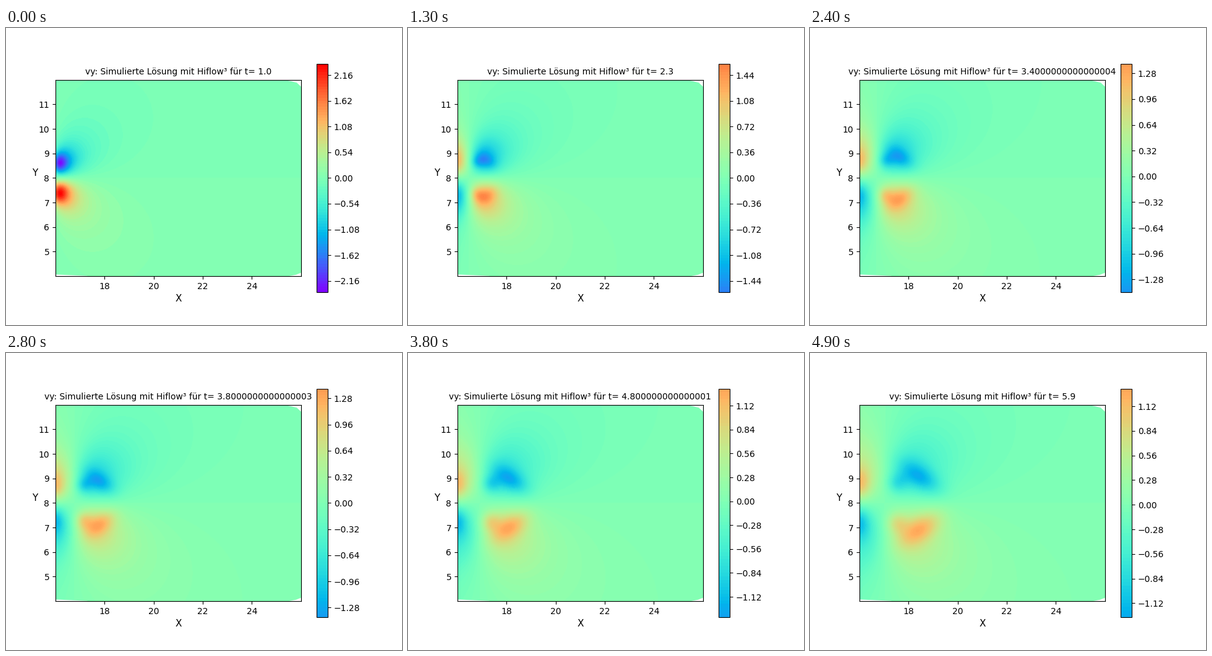
Write a matplotlib script that moves like this. It is 640 px wide and 480 px high and loops after 5 s.

```python
import numpy as np
import matplotlib.pyplot as plt
from matplotlib.animation import FuncAnimation

FRAMES, INTERVAL = 50, 100
T_START, T_REST = 1.0, 5.8  # the flow field rests after T_REST
LIMIT = 2.4                 # fixed colour range
AXIS_Y = 8

# Corners the mesh does not cover
GAPS = [
    [(25.3, 12), (25.6, 11.94), (25.83, 11.88), (26, 11.72), (26, 12)],
    [(25.5, 4), (25.8, 4.06), (26, 4.14), (26, 4)],
    [(16, 4.07), (17.3, 4.01), (17.3, 4), (16, 4)],
]

X, Y = np.meshgrid(np.linspace(16, 26, 201), np.linspace(4, 12, 161))


def odd(f):
    """Make a field antisymmetric about the jet axis."""
    return lambda x, y: f(x, y) - f(x, 2 * AXIS_Y - y)


def vortex(cx, cy, core, strength):
    """Vertical velocity of a viscous vortex."""
    def f(x, y):
        r2 = (x - cx) ** 2 + (y - cy) ** 2 + 1e-9
        return -strength * (x - cx) / r2 * (1 - np.exp(-r2 / core ** 2))
    return f


def lump(cx, cy, sx, sy, tilt=0.0):
    """Gaussian with its long axis turned by tilt."""
    c, s = np.cos(tilt), np.sin(tilt)

    def f(x, y):
        u = c * (x - cx) + s * (y - cy)
        w = c * (y - cy) - s * (x - cx)
        return np.exp(-0.5 * ((u / sx) ** 2 + (w / sy) ** 2))
    return f


def raise_to(field, level, cx, cy, sx, sy, tilt=0.0, blend=1.0):
    """Add a lump so that the field reaches a level at its centre."""
    weight = blend * (level - field(cx, cy))
    extra = odd(lump(cx, cy, sx, sy, tilt))
    return lambda x, y: field(x, y) + weight * extra(x, y)


def velocity(t):
    s = min(t, T_REST) - T_START
    peak = 1.44 - 0.032 * s + 0.93 * np.exp(-1.245 * s ** 1.26)
    low = peak + 0.035 * np.sin(np.pi * s / 4.4)

    # One growing vortex pair carries the far field.
    front = 15.85 + 0.55 * s ** 0.5
    offset = 0.6 + 0.083 * s
    strength = (0.78 + 0.33 * s ** 0.75) / offset
    field = odd(vortex(front, AXIS_Y + offset, 0.32 + 0.28 * s ** 0.7, strength))

    # Tilted head, rounder tail behind it, counterflow at the inlet
    field = raise_to(field, -peak, 16.2 + 0.83 * s ** 0.65, 8.62 + 0.087 * s,
                     0.2 + 0.1 * s, 0.15 + 0.04 * s, tilt=-0.6)
    field = raise_to(field, -peak * (0.9 - 0.05 * s),
                     front + 0.25 + 0.045 * s, 8.6 + 0.045 * s,
                     0.15 + 0.03 * s, 0.15 + 0.03 * s)
    field = raise_to(field, 1.15, 16, 8.5 + 0.055 * s,
                     0.15 + 0.03 * s, 0.25 + 0.04 * s,
                     blend=1 - np.exp(-3 * s))

    v = field(X, Y)
    v /= np.abs(v).max()
    return np.where(v > 0, peak, low) * v


fig = plt.figure(figsize=(6.4, 4.8), dpi=100)


def draw(i):
    t = T_START + 0.1 * i
    fig.clear()
    ax = fig.add_subplot()
    bands = ax.contourf(X, Y, velocity(t), 80, cmap="rainbow",
                        vmin=-LIMIT, vmax=LIMIT)
    for gap in GAPS:
        ax.add_patch(plt.Polygon(gap, facecolor="white", edgecolor="none", zorder=1.5))
    ax.set_aspect("equal")
    ax.set(xlim=(16, 26), ylim=(4, 12),
           xticks=range(18, 26, 2), yticks=range(5, 12))
    ax.set_xlabel("X", fontsize=11)
    ax.set_ylabel("Y", fontsize=11, rotation=0)
    ax.set_title(f"vy: Simulierte Lösung mit Hiflow³ für t= {t}", fontsize=10)
    fig.colorbar(bands, ax=ax)
    return []


anim = FuncAnimation(fig, draw, frames=FRAMES, interval=INTERVAL,
                     init_func=lambda: [], repeat=True, repeat_delay=0)
plt.show()
```
